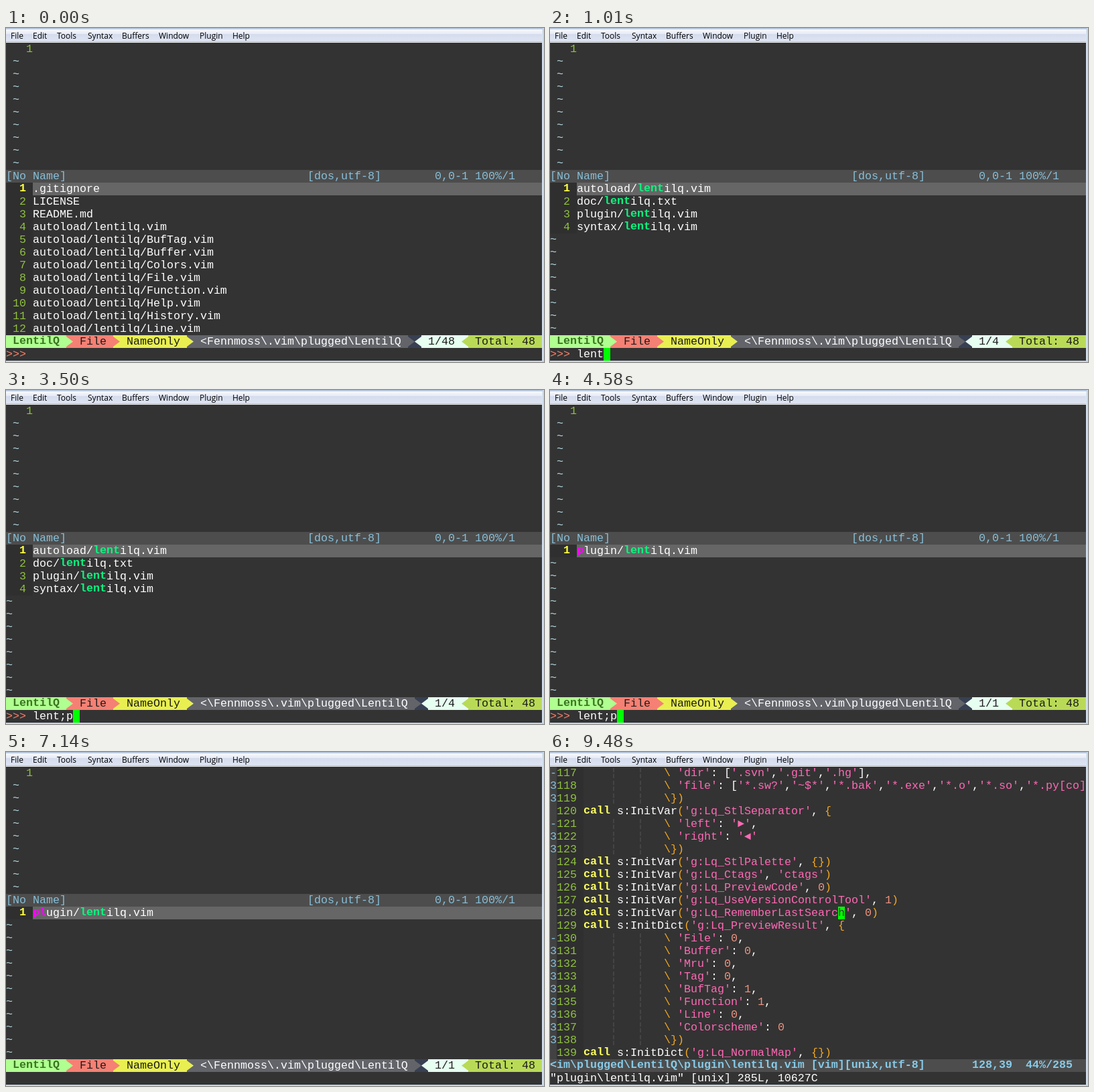
Write an HTML page that moves like this. It is 803 px wide and 499 px high and loops after 9.63 s.

```html
<!DOCTYPE html>
<html lang="en">
<head>
<meta charset="utf-8">
<title>Fuzzy file finder</title>
<style>
  html, body { margin: 0; width: 100%; height: 100%; overflow: hidden; background: #333; }
  svg { display: block; }
  .mono { font: 16.664px "Liberation Mono", monospace; white-space: pre; }
  .bold { font-weight: bold; }
  .menu { font: 12px "Open Sans", sans-serif; fill: #000; }
</style>
</head>
<body>
<svg id="stage" width="803" height="499" viewBox="0 0 803 499" xmlns="http://www.w3.org/2000/svg">
  <defs>
    <linearGradient id="bar" x1="0" y1="0" x2="0" y2="1">
      <stop offset="0" stop-color="#fdfdff"/>
      <stop offset=".42" stop-color="#e6eaf5"/>
      <stop offset=".43" stop-color="#d5dced"/>
      <stop offset="1" stop-color="#e0e6f4"/>
    </linearGradient>
  </defs>
  <rect width="803" height="499" fill="#333"/>
  <g id="screen"></g>
  <g id="frame">
    <rect width="803" height="22" fill="url(#bar)"/>
    <rect width="803" height="2" fill="#b8c8de"/>
    <rect y="20" width="801" height="1" fill="#b6bccc"/>
    <rect y="21" width="801" height="1" fill="#f0f0f0"/>
    <rect x="800" y="2" width="1" height="496" fill="#dfe8f2"/>
    <rect x="801" width="2" height="499" fill="#c3d7ee"/>
    <rect y="497" width="803" height="2" fill="#c3d3e6"/>
  </g>
</svg>
<script>
const LOOP = 9630, CELL = 10, LINE = 19, TOP = 22;
const PLUGIN = 'LentilQ', base = 'lentilq';
const C = {
  text: '#ffffff', num: '#8fc13e', curNum: '#ffff40', tilde: '#b5dde6', sky: '#87bfd8',
  status: '#4d4d4d', line: '#666666', gutter: '#2f2f2f', hit: '#0cf57f', hit2: '#ff00ff',
  cursor: '#00ff00', prompt: '#f4806a', string: '#ff69b4', delim: '#f5a81c',
  number: '#f0937f', call: '#ffff60', guide: '#4e4e4e', active: '#87cbe8', ink: '#1c1c1c'
};
const screen = document.getElementById('screen');

const esc = s => s.replace(/&/g, '&amp;').replace(/</g, '&lt;').replace(/>/g, '&gt;');
const yOf = row => TOP + row * LINE;

function box(col, row, cols, fill) {
  return `<rect x="${col * CELL}" y="${yOf(row)}" width="${cols * CELL}" height="${LINE}" fill="${fill}"/>`;
}

// Bold glyphs sit one pixel higher than regular ones.
function put(col, row, text, fill, bold) {
  if (!text.trim()) return '';
  return `<text class="mono${bold ? ' bold' : ''}" x="${col * CELL}" y="${yOf(row) + (bold ? 13 : 14)}" fill="${fill}">${esc(text)}</text>`;
}

function wedge(col, row, fill, left) {
  const a = col * CELL + (left ? CELL : 0), b = col * CELL + (left ? 0 : CELL), y = yOf(row);
  return `<path d="M${a} ${y + 2}L${b} ${y + 9.5}L${a} ${y + 17}Z" fill="${fill}"/>`;
}

// {x} marks a match, <x> a match of the second pattern.
function marked(col, row, s) {
  let out = '';
  for (const part of s.match(/\{.*?\}|<.*?>|[^{<]+/g)) {
    const kind = part[0], hit = kind === '{' || kind === '<';
    const text = hit ? part.slice(1, -1) : part;
    out += put(col, row, text, kind === '{' ? C.hit : kind === '<' ? C.hit2 : C.text, hit);
    col += text.length;
  }
  return out;
}

const dir = `autoload/${base}/`, py = `${dir}python/${base}/`;
const own = n => ['autoload/*.vim', 'doc/*.txt', 'plugin/*.vim', 'syntax/*.vim']
  .map(p => p.replace('*', `{${base.slice(0, n)}}${base.slice(n)}`));
const vims = names => names.split(' ').map(n => `${dir}${n}.vim`);
const pys = names => names.split(' ').map(n => `${py}${n}.py`);

const all = ['.gitignore', 'LICENSE', 'README.md', `autoload/${base}.vim`,
  ...vims('BufTag Buffer Colors File Function Help History Line')];
const one = [...own(1), ...pys('{l}ineExpl'), '{L}ICENSE', ...vims('{L}ine Fi{l}e He{l}p Co{l}ors'),
  ...pys('fi{l}eExpl he{l}pExpl')];
const two = [...own(2), ...pys('{l}ine{E}xpl'), '{L}IC{E}NSE', ...vims('{L}in{e} Fi{le}'),
  ...pys('fi{le}Expl he{l}p{E}xpl se{l}f{E}xpl co{l}orscheme{E}xpl')];
const refined = p => [own(4)[2].replace(p, `<${p}>`)];

const lists = [[0, all, 48], [300, one, 28], [580, two, 17], [730, own(3), 4],
  [1010, own(4), 4], [3650, refined('p'), 1], [4730, refined('pl'), 1]];
const typed = [[0, ''], [300, 'l'], [580, 'le'], [730, 'len'], [1010, 'lent'],
  [3100, 'lent;'], [3500, 'lent;p'], [4730, 'lent;pl']];
const hidden = [[0, 300], [1560, 2090], [2520, 3100], [4050, 4580], [5160, 5720], [6270, 6710],
  [7960, 8240], [8640, 8920], [9330, 9480]];
const CLEARED = 7140, OPENED = 7290;

const latest = (steps, t) => steps.filter(s => s[0] <= t).pop();
const cursorOn = t => !hidden.some(([a, b]) => t >= a && t < b);

function finderBar(count) {
  const row = 23, green = '#b0ff91', red = '#f58074', yellow = '#e9ef51',
    grey = '#626469', dark = '#384052', mint = '#e6fff0', lime = '#b9da57';
  const tally = ` 1/${count} `, start = 68 - tally.length, end = start - 2;
  const path = `${count > 9 ? '<' : '<\\'}Fennmoss\\.vim\\plugged\\${PLUGIN}`;
  return box(0, row, 9, green) + put(1, row, PLUGIN, '#3a7420', true) +
    box(9, row, 7, red) + wedge(9, row, green) + put(11, row, 'File', C.ink) +
    box(16, row, 11, yellow) + wedge(16, row, red) + put(18, row, 'NameOnly', C.ink) +
    box(27, row, end - 27, grey) + wedge(27, row, yellow) + put(29, row, path, C.text) +
    box(end, row, 2, dark) + wedge(end, row, grey) + wedge(end + 1, row, mint, true) +
    box(start, row, 69 - start, mint) + put(start, row, tally, C.ink) +
    wedge(68, row, lime, true) + box(69, row, 11, lime) + put(70, row, 'Total: 48', C.ink);
}

function finder(t) {
  const [, files, count] = latest(lists, t), query = latest(typed, t)[1];
  let out = put(3, 0, '1', C.num);
  for (let r = 1; r < 10; r++) out += put(1, r, '~', C.tilde);
  out += box(0, 10, 80, C.status) + put(0, 10, '[No Name]', C.sky) +
    put(45, 10, '[dos,utf-8]', C.sky) + put(64, 10, '0,0-1 100%/1', C.sky);
  for (let i = 0; i < 12; i++) {
    const row = 11 + i;
    if (i >= files.length) {
      out += put(0, row, '~', C.tilde);
      continue;
    }
    out += box(0, row, 4, C.gutter);
    if (!i) out += box(4, row, 76, C.line);
    const n = String(i + 1);
    out += put(3 - n.length, row, n, i ? C.num : C.curNum, !i) + marked(4, row, files[i]);
  }
  out += finderBar(count);
  if (t < CLEARED) {
    out += put(0, 24, '>>>', C.prompt) + put(4, 24, query, C.text);
    if (cursorOn(t)) out += box(4 + query.length, 24, 1, C.cursor);
  }
  return out;
}

const setVar = (name, value) => `call s:InitVar('g:Lq_${name}', ${value}`;
const setDict = (name, value) => `call s:InitDict('g:Lq_${name}', ${value}`;
const more = s => ' '.repeat(12) + '\\' + s;
const flags = 'File:0 Buffer:0 Mru:0 Tag:0 BufTag:1 Function:1 Line:0 Colorscheme:0'.split(' ');
const code = [
  more(" 'dir': ['.svn','.git','.hg'],"),
  more(" 'file': ['*.sw?','~$*','*.bak','*.exe','*.o','*.so','*.py[co]'"),
  more('})'),
  setVar('StlSeparator', '{'),
  more(" 'left': '►',"),
  more(" 'right': '◄'"),
  more('})'),
  setVar('StlPalette', '{})'),
  setVar('Ctags', "'ctags')"),
  setVar('PreviewCode', '0)'),
  setVar('UseVersionControlTool', '1)'),
  setVar('RememberLastSearch', '0)'),
  setDict('PreviewResult', '{'),
  ...flags.map((f, i) => {
    const [name, value] = f.split(':');
    return more(` '${name}': ${value}${i < flags.length - 1 ? ',' : ''}`);
  }),
  more('})'),
  setDict('NormalMap', '{})')
];

function colorOf(token) {
  if (token === 'call') return C.call;
  if (token[0] === "'") return C.string;
  if (/^[\\(){}]/.test(token)) return C.delim;
  return /^\d/.test(token) ? C.number : C.text;
}

function codeLine(row, s) {
  let out = '', col = 5;
  for (const token of s.match(/'[^']*'|^call|[\\(){}]|\d+|[^'\\(){}\d]+/g)) {
    out += put(col, row, token, colorOf(token), token === 'call');
    col += token.length;
  }
  return out;
}

function editor(t) {
  let out = `<rect x="0" y="${TOP}" width="10" height="${23 * LINE}" fill="#424242"/>` +
    `<rect x="10" y="${TOP}" width="40" height="${23 * LINE}" fill="${C.gutter}"/>`;
  code.forEach((s, row) => {
    const inner = s[0] === ' ', head = row === 0 || (inner && code[row - 1][0] !== ' ');
    if (inner) {
      out += put(0, row, head ? '-' : '3', C.sky) +
        put(9, row, '¦', C.guide) + put(13, row, '¦', C.guide);
    }
    out += put(1, row, String(117 + row), C.num) + codeLine(row, s);
  });
  if (cursorOn(t)) out += box(43, 11, 1, C.cursor) + put(43, 11, 'h', '#333333');
  return out + box(0, 23, 80, C.status) +
    put(0, 23, `<im\\plugged\\${PLUGIN}\\plugin\\${base}.vim [vim][unix,utf-8]`, C.active, true) +
    put(63, 23, '128,39', C.active, true) + put(71, 23, '44%/285', C.active, true) +
    put(0, 24, `"plugin\\${base}.vim" [unix] 285L, 10627C`, C.text);
}

const menu = { File: 7, Edit: 40, Tools: 76, Syntax: 122, Buffers: 173, Window: 228, Plugin: 289, Help: 338 };
document.getElementById('frame').innerHTML += Object.entries(menu)
  .map(([label, x]) => `<text class="menu" x="${x}" y="16">${label}</text>`).join('');

let shown = '';
function draw() {
  const t = performance.now() % LOOP;
  const next = t < OPENED ? finder(t) : editor(t);
  if (next !== shown) screen.innerHTML = shown = next;
  requestAnimationFrame(draw);
}
draw();
</script>
</body>
</html>
```
